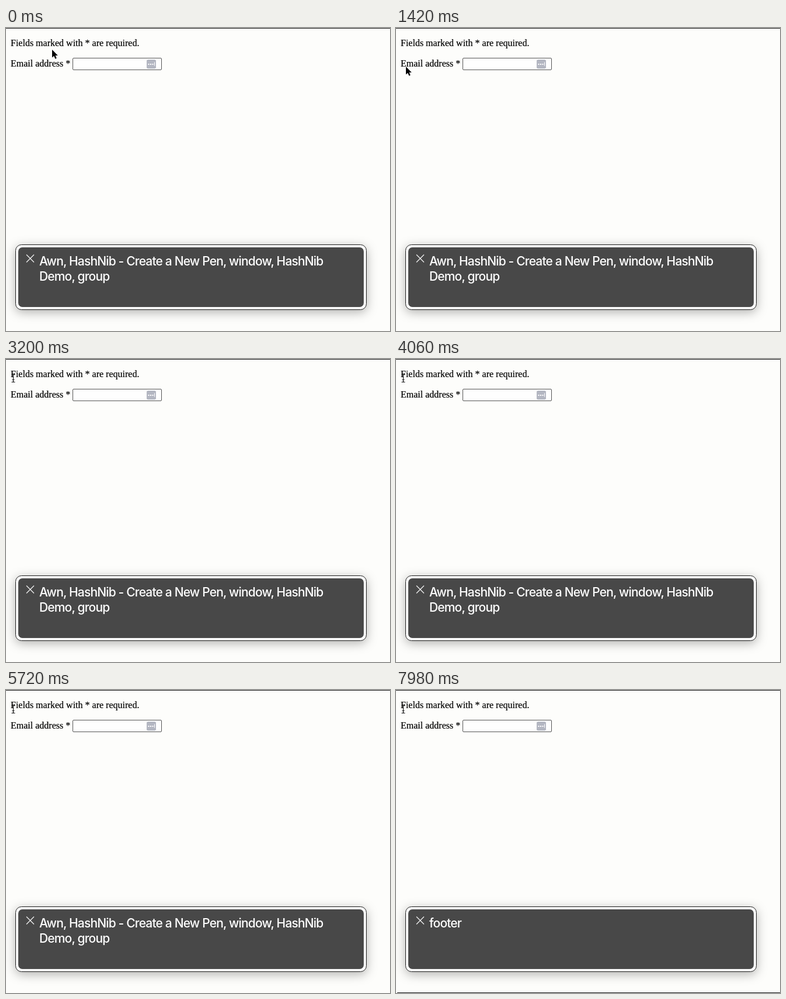
These frames come from a looping animation (658 px wide and 518 px high, 8000 ms). An HTML page:

```html
<!DOCTYPE html>
<html lang="en">
<head>
<meta charset="utf-8">
<title>Screen reader form demo</title>
<style>
  html, body { margin: 0; width: 100%; height: 100%; overflow: hidden; background: #fdfdfb; }
  svg { display: block; }
  .page { font: 16px "Liberation Serif", "Times New Roman", serif; fill: #000; stroke: #000; stroke-width: .2; }
  .speech { font: 500 21px Inter, Roboto, sans-serif; letter-spacing: -.04em; fill: #fff; }
  .glow { filter: drop-shadow(0 4px 9px rgba(0, 0, 0, .3)); }
</style>
</head>
<body>
<svg width="658" height="518" viewBox="0 0 658 518">
  <rect width="658" height="518" fill="#fdfdfb"/>
  <rect width="658" height="1" fill="#1c1c1c"/>
  <rect id="footerLine" x="2" y="517" width="656" height="1" fill="#1c1c1c"/>

  <g class="page">
    <text x="8" y="31">Fields marked with * are required.</text>
    <text x="8" y="66">Email address *</text>
  </g>
  <rect x="114.5" y="51.5" width="152" height="20" rx="1.5" fill="#fefefe" stroke="#555"/>
  <rect x="241" y="54" width="16" height="15.5" rx="2.5" fill="#b4b7c2"/>
  <path d="M243.500 61h2v2h-2zM247 61h2v2h-2zM250.500 61h2v2h-2zM254 58.500h1v6h-1z" fill="#fff"/>

  <rect class="glow" x="16.5" y="370.5" width="601" height="111" rx="10" fill="#fefefe" stroke="#1c1c1c"/>
  <rect x="21" y="375" width="592" height="102" rx="7" fill="#484848"/>
  <path d="M35 387.500l13 13m0-13l-13 13" stroke="#f0f0f0" stroke-width="1.3" fill="none"/>
  <g class="speech">
    <text id="line1" x="57" y="406"></text>
    <text id="line2" x="57" y="432"></text>
  </g>

  <path id="arrow" d="M0 0V13.500L3.200 10.700 5.400 15.800 7.700 14.800 5.600 9.900H9.800Z"
        fill="#000" stroke="#fff" stroke-width="1" paint-order="stroke"/>
  <path id="beam" d="M-3-6.500H-1.500Q0-6.500 0-5Q0-6.500 1.500-6.500H3M0-5V5M-3 6.500H-1.500Q0 6.500 0 5Q0 6.500 1.500 6.500H3M-2 2.500H2"
        fill="none" stroke="#1c1c1c" stroke-width="1.2"/>
</svg>
<script>
  const LOOP = 8000, FOOTER_AT = 7180;
  const $ = id => document.getElementById(id);
  const show = (el, on) => el.style.display = on ? "" : "none";

  // Pointer stops: time, x, y. It sweeps the sentence, dips to the label and returns.
  const stops = [
    [0, 79, 37], [20, 79, 37], [600, 226, 24], [1100, 12.5, 33], [1280, 12.5, 33],
    [1420, 17, 66], [1520, 17, 66], [2000, 12.5, 33], [LOOP, 12.5, 33]
  ];

  function pointerAt(t) {
    const i = stops.findIndex(s => s[0] > t);
    const [t0, x0, y0] = stops[i - 1], [t1, x1, y1] = stops[i];
    const p = (t - t0) / (t1 - t0), e = p * p * (3 - 2 * p);
    return [x0 + (x1 - x0) * e, y0 + (y1 - y0) * e];
  }

  function draw(t) {
    const [x, y] = pointerAt(t);
    const overText = y >= 17 && y < 35;
    for (const id of ["arrow", "beam"]) $(id).setAttribute("transform", `translate(${x} ${y})`);
    show($("beam"), overText);
    show($("arrow"), !overText);

    const footer = t >= FOOTER_AT;
    $("line1").textContent = footer ? "footer" : "Awn, HashNib - Create a New Pen, window, HashNib";
    $("line2").textContent = footer ? "" : "Demo, group";
    show($("footerLine"), footer);
  }

  const start = performance.now();
  function frame() {
    draw((performance.now() - start) % LOOP);
    requestAnimationFrame(frame);
  }
  frame();
</script>
</body>
</html>
```
